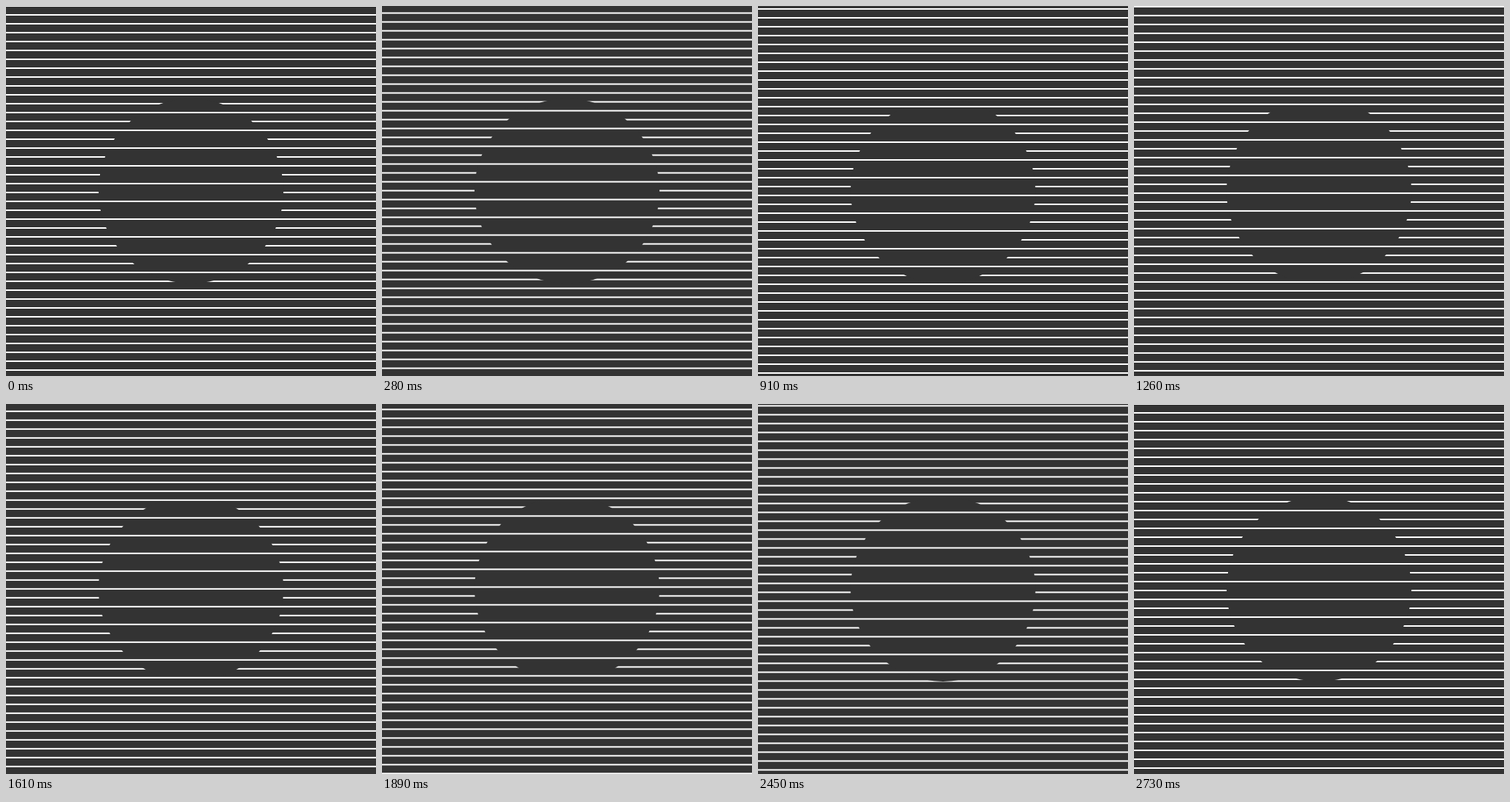
An HTML page with a canvas that plays this animation: 500 px wide and 500 px high, repeating every 2800 ms.

```html
<!DOCTYPE html>
<html lang="en">
<head>
<meta charset="utf-8">
<title>Rising lines</title>
<style>
  html, body { margin: 0; width: 100%; height: 100%; overflow: hidden; background: #333; }
  canvas { display: block; }
</style>
</head>
<body>
<canvas id="stage" width="500" height="500"></canvas>
<script>
const SIZE = 500, SPACING = 24, THICKNESS = 2, RADIUS = 125;
const STEP_MS = 70, STEPS = 40;
const ctx = document.getElementById('stage').getContext('2d');

function drawLines(start) {
  ctx.fillStyle = '#fff';
  for (let y = start; y < SIZE + SPACING; y += SPACING) {
    ctx.fillRect(0, y - THICKNESS / 2, SIZE, THICKNESS);
  }
}

function draw(now) {
  // The last step lands on the same pose as the first.
  const step = Math.floor(now / STEP_MS) % STEPS;
  const rise = SPACING * step / (STEPS - 1);

  ctx.fillStyle = '#333';
  ctx.fillRect(0, 0, SIZE, SIZE);
  drawLines(SPACING / 2 - rise);

  // The disc hides every other line.
  ctx.fillStyle = '#333';
  ctx.beginPath();
  ctx.arc(SIZE / 2, SIZE / 2, RADIUS, 0, Math.PI * 2);
  ctx.fill();
  drawLines(-rise);

  requestAnimationFrame(() => draw(performance.now() - startTime));
}

const startTime = performance.now();
draw(0);
</script>
</body>
</html>
```
